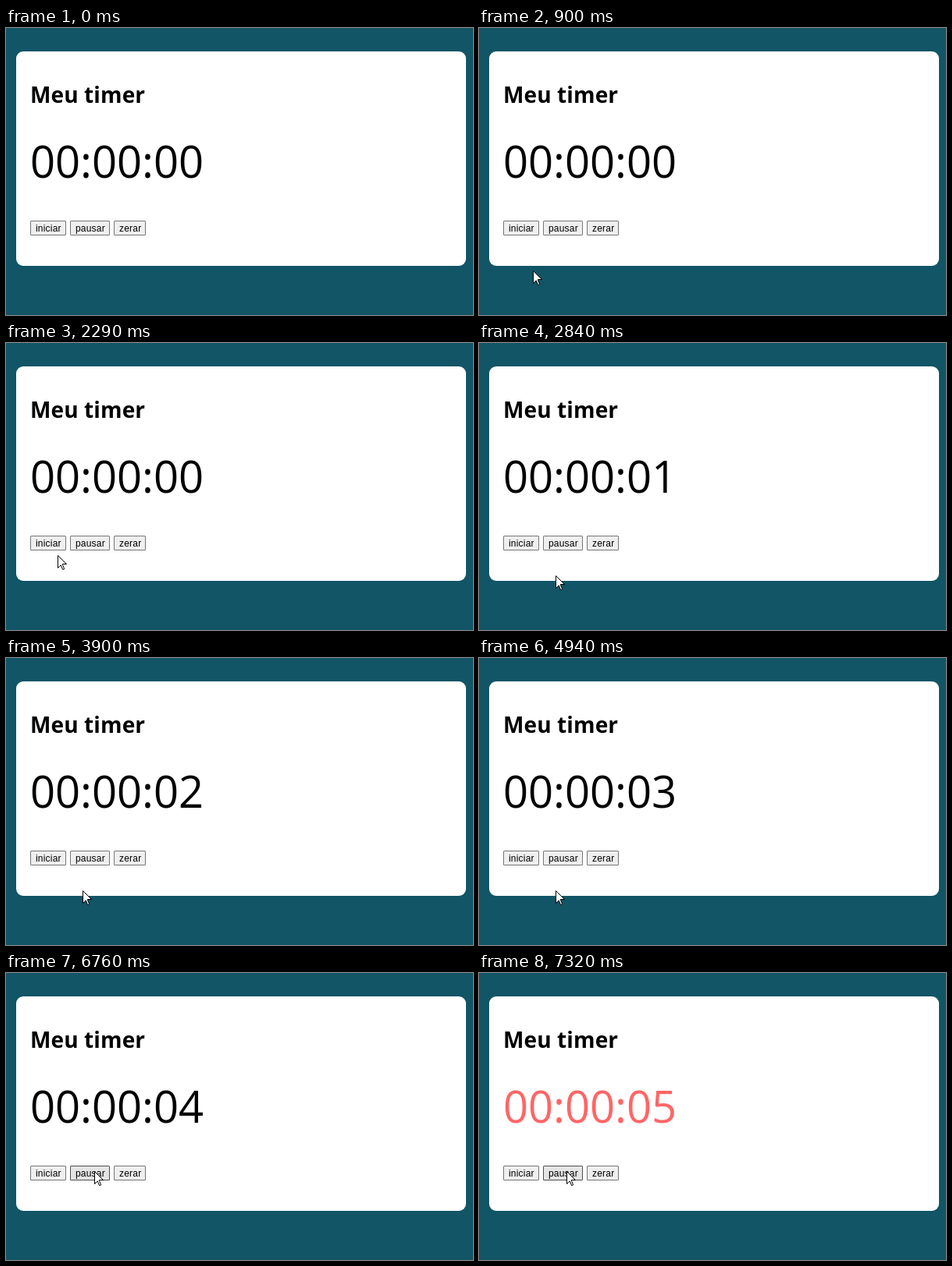
Animation, 598 px wide and 368 px high, one loop 8000 ms. Source, as an HTML page with a canvas:

```html
<!DOCTYPE html>
<html lang="pt">
<head>
<meta charset="utf-8">
<title>Meu timer</title>
<style>
html, body { margin: 0; width: 100%; height: 100%; overflow: hidden; background: #115566; }
canvas { display: block; }
</style>
</head>
<body>
<canvas id="stage" width="598" height="368"></canvas>
<script>
const ctx = document.getElementById('stage').getContext('2d', { alpha: false });
const LOOP = 8000;
const TEAL = '#115566';

const BUTTON_Y = 247, BUTTON_H = 19;
const buttons = [
  { label: 'iniciar', x: 31, w: 46, down: 1600, up: 1810 },
  { label: 'pausar', x: 82, w: 51, down: 6900, up: 7110 },
  { label: 'zerar', x: 138, w: 41 }
];

const FIRST_TICK = 2840, TICK = 1045, PAUSED_AT = 7110;

// The pointer glides to each stop in turn, moving once per STEP
const STEP = 71;
const ENTRY = { x: 92, y: 368 };
const glides = [
  { start: 549, steps: 11, x: 48, y: 257 },
  { start: 2206, steps: 4, x: 98, y: 298 },
  { start: 6127, steps: 3, x: 112, y: 251 },
  { start: 6334, steps: 6, x: 113, y: 254 },
  { start: 7249, steps: 1, x: 112, y: 254 }
];

const arrow = new Path2D('M.5 .5V16.5L4.2 12.8L6.6 18.5L8.7 17.7L6.4 12.2V11.5H11.5Z');

const easeOut = p => 1 - (1 - p) ** 1.6;
const lerp = (a, b, p) => Math.round(a + (b - a) * p);

function pointerAt(t) {
  if (t < glides[0].start + STEP) return null;
  let pos = ENTRY;
  for (const g of glides) {
    const n = Math.floor((t - g.start) / STEP);
    const p = easeOut(Math.min(1, Math.max(0, n / g.steps)));
    pos = { x: lerp(pos.x, g.x, p), y: lerp(pos.y, g.y, p) };
  }
  return pos;
}

function text(str, x, y, font, color = '#000', spacing = 0) {
  ctx.font = font;
  ctx.letterSpacing = spacing + 'px';
  ctx.fillStyle = color;
  ctx.fillText(str, x, y);
}

function roundBox(x, y, w, h, r, color) {
  ctx.beginPath();
  ctx.roundRect(x, y, w, h, r);
  ctx.fillStyle = color;
  ctx.fill();
}

function drawButton(b, t, pos) {
  const hover = pos && pos.x >= b.x && pos.x < b.x + b.w &&
    pos.y >= BUTTON_Y && pos.y < BUTTON_Y + BUTTON_H;
  const active = t >= b.down && t < b.up;
  const [border, fill] = active ? ['#8d8d8d', '#f5f5f5']
    : hover ? ['#4f4f4f', '#e5e5e5'] : ['#767676', '#efefef'];
  roundBox(b.x, BUTTON_Y, b.w, BUTTON_H, 1.5, border);
  roundBox(b.x + 1, BUTTON_Y + 1, b.w - 2, BUTTON_H - 2, 0.5, fill);
  text(b.label, b.x + 7, 261, '12px "Liberation Sans", Arial, sans-serif', '#000', 0.2);
}

function drawPointer({ x, y }) {
  ctx.save();
  ctx.translate(x, y);
  ctx.fillStyle = '#fff';
  ctx.strokeStyle = '#000';
  ctx.lineWidth = 1;
  ctx.fill(arrow);
  ctx.stroke(arrow);
  ctx.restore();
}

function draw(t) {
  ctx.fillStyle = TEAL;
  ctx.fillRect(0, 0, 598, 368);
  roundBox(13, 30, 576, 275, 9, '#fff');
  text('Meu timer', 31, 96, 'bold 28px "Open Sans", "Noto Sans", sans-serif', '#000', 0.12);

  const seconds = Math.max(0, Math.floor((Math.min(t, PAUSED_AT) - FIRST_TICK) / TICK) + 1);
  text('00:00:' + String(seconds).padStart(2, '0'), 31, 192,
    '56px "Open Sans", "Noto Sans", sans-serif', t >= PAUSED_AT ? '#ff6666' : '#000');

  const pos = pointerAt(t);
  for (const b of buttons) drawButton(b, t, pos);
  if (pos) drawPointer(pos);
}

const start = performance.now();
function frame() {
  draw((performance.now() - start) % LOOP);
  requestAnimationFrame(frame);
}
frame();
</script>
</body>
</html>
```
